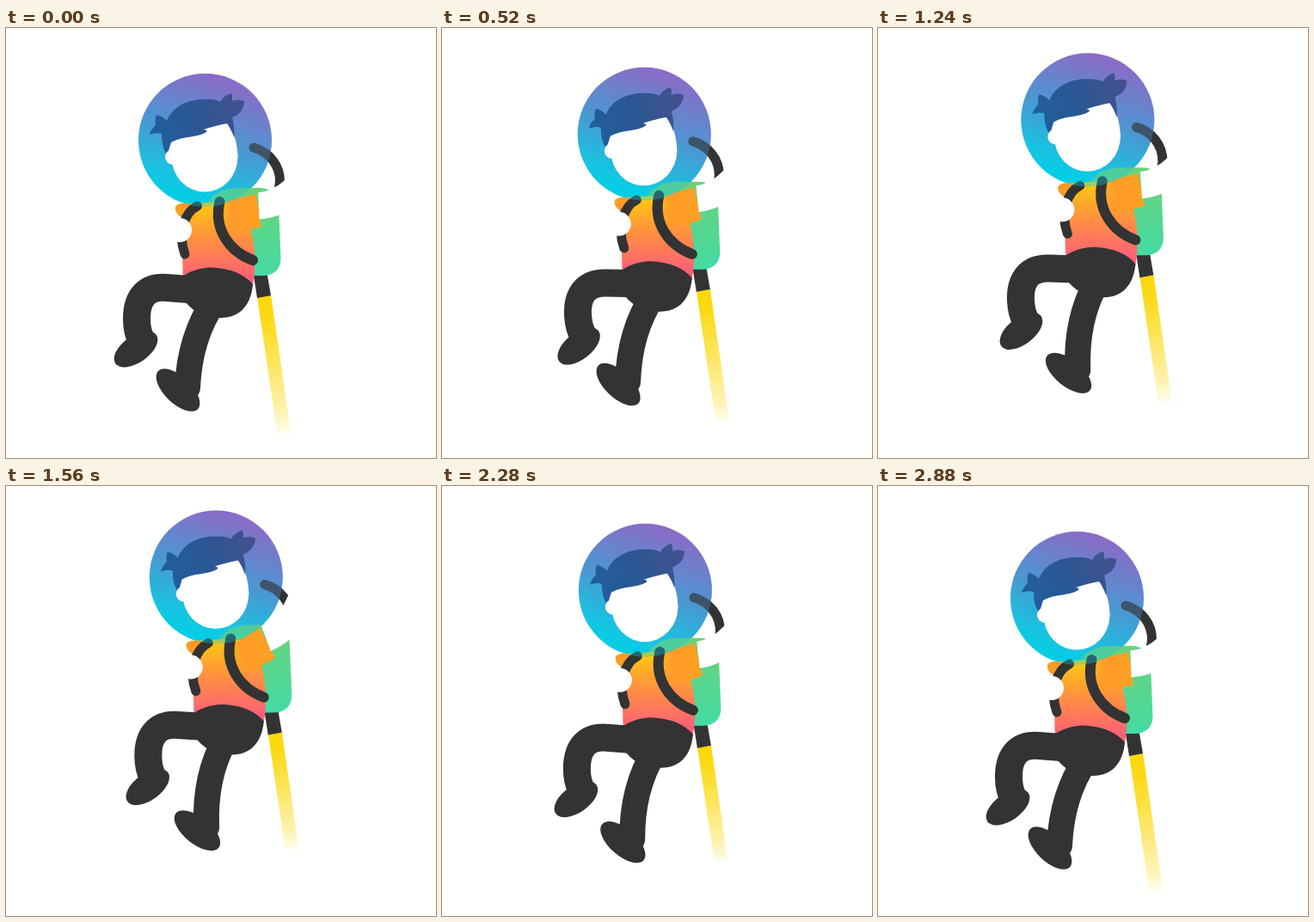
Write an HTML page with a canvas that moves like this. It is 500x500 px and loops after 2920 ms.

```html
<!DOCTYPE html>
<html>
<head>
<meta charset="utf-8">
<style>
html, body { margin: 0; width: 100%; height: 100%; overflow: hidden; background: #fff; }
canvas { display: block; width: 500px; height: 500px; }
</style>
</head>
<body>
<canvas id="stage"></canvas>
<script>
const LOOP = 2920, DARK = '#333';
const canvas = document.getElementById('stage');
const ctx = canvas.getContext('2d');
const ratio = window.devicePixelRatio || 1;
canvas.width = canvas.height = 500 * ratio;

// time/value pairs, eased with a half cosine between neighbours
const ARM = [[-320, 4.5], [340, -6.2], [950, 6], [1770, -23], [2600, 4.5], [3220, -6.2]];
const LEFT_LEG = [[0, 0], [720, -4], [1900, 0], [2920, 0]];
const RIGHT_LEG = [[0, 0], [240, 0], [1400, -5.1], [1780, -5.1], [2890, 0], [2920, 0]];
const FLAME = [[0, 472], [240, 477], [520, 465], [590, 478], [920, 423], [1160, 460],
  [1560, 447], [1960, 464], [2280, 446], [2680, 472], [2920, 471]];

function ease(keys, t) {
  let i = 0;
  while (i < keys.length - 2 && t >= keys[i + 1][0]) i++;
  const [t0, a] = keys[i], [t1, b] = keys[i + 1];
  const p = Math.min(1, Math.max(0, (t - t0) / (t1 - t0)));
  return a + (b - a) * (1 - Math.cos(Math.PI * p)) / 2;
}

function gradient(x0, y0, x1, y1, ...stops) {
  const g = ctx.createLinearGradient(x0, y0, x1, y1);
  stops.forEach(([at, color]) => g.addColorStop(at, color));
  return g;
}

function shape(d, fill) {
  ctx.fillStyle = fill;
  ctx.fill(new Path2D(d));
}

function line(d, width, color = DARK, cap = 'round') {
  ctx.lineWidth = width;
  ctx.strokeStyle = color;
  ctx.lineCap = cap;
  ctx.lineJoin = 'round';
  ctx.stroke(new Path2D(d));
}

function oval(x, y, rx, ry, fill, deg = 0) {
  ctx.beginPath();
  ctx.ellipse(x, y, rx, ry, deg * Math.PI / 180, 0, 2 * Math.PI);
  ctx.fillStyle = fill;
  ctx.fill();
}

function turned(x, y, deg, paint) {
  ctx.save();
  ctx.translate(x, y);
  ctx.rotate(deg * Math.PI / 180);
  ctx.translate(-x, -y);
  paint();
  ctx.restore();
}

function jet(end) {
  const x = y => 300 + (y - 312) * 0.146;
  const fade = gradient(300, 312, x(end), end,
    [0, 'rgba(252,215,8,1)'], [0.15, 'rgba(252,215,8,.95)'],
    [0.5, 'rgba(252,215,8,.64)'], [0.85, 'rgba(252,215,8,.3)'], [1, 'rgba(252,215,8,.05)']);
  shape(`M292 312 L308 310 L${x(end) + 8} ${end} L${x(end) - 8} ${end} Z`, fade);
  shape('M287 282 L303 282 L308 311 L292 314 Z', DARK);
}

function pack() {
  line('M288 139 C306 144 319 160 318.5 179 L317 190', 11);
  shape('M232 208 C240 192 252 186 272 186 L294 186 C309 186 316 194 317 207 L319.5 268 C319.5 281 311 288 298 288 L250 288 Z',
    gradient(0, 186, 0, 288, [0, '#6cd277'], [1, '#44dba4']));
}

function legs(left, right) {
  turned(215, 300, left, () => {
    line('M240 306 L187 302 C164 300 152 313 152 338 C152 350 154 356 157 362', 32);
    oval(151, 373.5, 29, 15.5, DARK, -35);
  });
  turned(250, 315, right, () => {
    line('M242 318 C224 344 213 375 211 418', 30);
    oval(200, 421, 32, 15.5, DARK, 44);
  });
}

function torso(arm) {
  const warm = gradient(0, 200, 0, 290, [0, '#fdd00a'], [0.45, '#ff963a'], [1, '#ff6078']);
  shape('M212 204 C201 203 196 206 197 211 Q198 217 206 221 L205 262 L206 300 L287 300 C290 280 291 262 285 236 L285 212 Q276 205 250 202 Z', warm);
  shape('M213 204 C201 203 196 206 197 211 Q198 217 206 221 L214 211 Z', '#ff9a25');
  turned(275, 218, arm, () => {
    shape('M246 204 Q266 198 291 193.5 L297 231.5 Q278 237 252 238 Z',
      gradient(244, 0, 294, 0, [0, 'rgba(255,166,28,0)'], [0.4, '#ff9a2a'], [1, '#ffa022']));
  });
  line('M222.5 207 C208 214 199 238 208 263', 11);
  line('M248.5 202 C241 234 260 260 287 270', 12);
}

function hips() {
  shape('M205 289 C216 281 229 278.5 240 278.5 C262 279.5 278 287 287 298 C285 322 272 337 250 337 C232 338 216 330 205 314 Z', DARK);
}

function glass(alpha) {
  ctx.globalAlpha = alpha;
  oval(231.5, 130.5, 77.5, 77.5, gradient(213, 207, 264, 57,
    [0, '#00d0e8'], [0.15, '#14c6e2'], [0.5, '#4a98d2'], [1, '#8f68c6']));
  ctx.globalAlpha = 1;
}

function head() {
  oval(231, 150, 38.5, 40.5, '#fff');
  shape('M188 146 L191 131 L230 114 L257 108 C264 118 269 132 269.5 150 L231 170 Z', '#fff');
  const hair = gradient(170, 130, 275, 85, [0, '#1f5f9c'], [0.5, '#2b5793'], [1, '#44508f']);
  shape('M187 147 C183 141 181 134 181 123 Q175 121 167 124 Q169 117 174 113 Q173 106 175 101 Q183 103 187 108 ' +
    'C193 92 211 83 229 83 Q242 82 249 86 Q254 78 262 76 Q264 80 263 85 Q270 82 277 85 Q277 98 263 104 ' +
    'Q266 114 265.5 128 Q262 118 257 111 C247 113 238 115 230 118 Q235 119 233 121 C222 128 206 125 192 133 Q190 139 189 143 Z', hair);
  oval(194, 150, 9, 9, '#fff');
}

function hands(arm) {
  oval(202, 235, 14, 14, '#fff');
  turned(275, 218, arm, () => {
    line('M294 207 C324 206 353 178 371 140', 31, '#fff', 'butt');
    oval(371, 140, 16, 16, '#fff');
  });
}

function draw(t) {
  const lift = (1 - Math.cos(2 * Math.PI * t / 2885)) / 2;
  const arm = ease(ARM, t);
  ctx.setTransform(ratio, 0, 0, ratio, 0, 0);
  ctx.fillStyle = '#fff';
  ctx.fillRect(0, 0, 500, 500);
  ctx.translate(13 * lift, -24.8 * lift);
  glass(1);
  jet(ease(FLAME, t));
  pack();
  torso(arm);
  legs(ease(LEFT_LEG, t), ease(RIGHT_LEG, t));
  hips();
  glass(0.35);
  head();
  hands(arm);
}

const start = performance.now();
function tick() {
  draw((performance.now() - start) % LOOP);
  requestAnimationFrame(tick);
}
tick();
</script>
</body>
</html>
```
